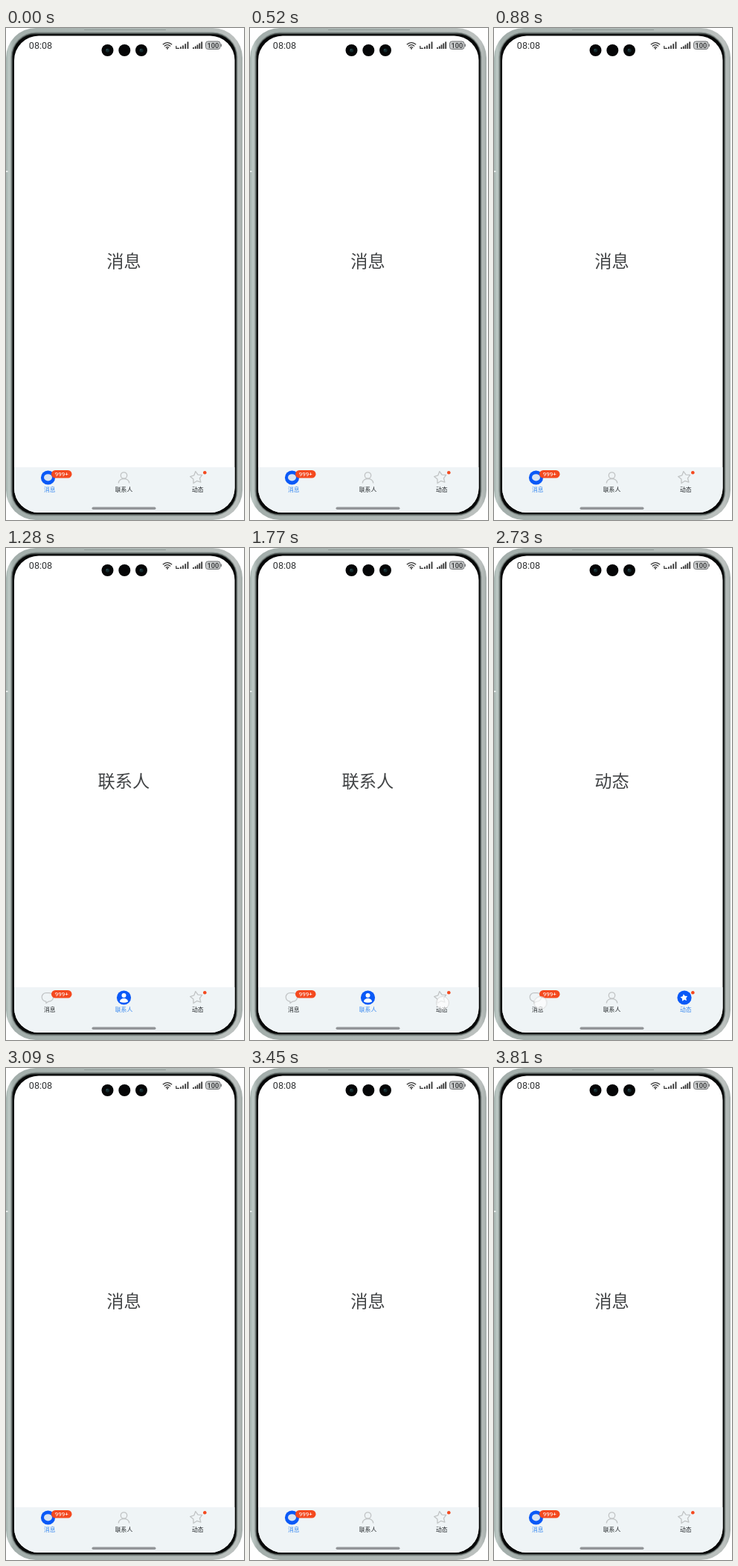
Write an HTML page that moves like this. It is 320x662 px and loops after 3850 ms.

```html
<!DOCTYPE html>
<html lang="en">
<head>
<meta charset="utf-8">
<title>Tab bar</title>
<style>
  html, body { margin: 0; width: 100%; height: 100%; overflow: hidden; background: #fff; }
  svg { display: block; width: 320px; height: 662px; }
  text { font-family: "Noto Sans CJK SC", "Noto Sans CJK", sans-serif; text-anchor: middle; }
  .title { font-size: 23.2px; fill: #424446; }
  .label { font-size: 7.8px; font-weight: 500; fill: color-mix(in srgb, #3a8af0 calc(var(--on) * 100%), #24282b); }
  .latin { font-family: Roboto, sans-serif; }

  .pages { animation: slide 3850ms cubic-bezier(.4, 0, .2, 1) infinite; }
  .tab { animation: 3850ms step-end infinite; }
  .messages { animation-name: messages; }
  .contacts { animation-name: contacts; }
  .moments { animation-name: moments; }
  .on { opacity: var(--on); }
  .off { opacity: calc(1 - var(--on)); fill: none; stroke: #c1c4c5; stroke-width: 1.3; stroke-linejoin: round; }
  .touch { fill: #fff; fill-opacity: .65; stroke: #d2d2d4; stroke-width: .8; animation: touch 3850ms step-end infinite; }

  @keyframes slide {
    0%, 25.45% { transform: translateX(0); }
    33.1%, 46.68% { transform: translateX(-297px); }
    54.47%, 71.95% { transform: translateX(-594px); }
    79.75%, 100% { transform: translateX(0); }
  }
  @keyframes messages { 0% { --on: 1; } 25.45% { --on: 0; } 71.95%, 100% { --on: 1; } }
  @keyframes contacts { 0% { --on: 0; } 25.45% { --on: 1; } 46.68%, 100% { --on: 0; } }
  @keyframes moments { 0% { --on: 0; } 46.68% { --on: 1; } 71.95%, 100% { --on: 0; } }
  @keyframes touch {
    0% { opacity: 0; transform: translate(160px, 612px); }
    23.6% { opacity: 1; transform: translate(160px, 612px); }
    25.45% { opacity: 0; transform: translate(160px, 612px); }
    44.6% { opacity: 1; transform: translate(259px, 612px); }
    46.68% { opacity: 0; transform: translate(259px, 612px); }
    70.1% { opacity: 1; transform: translate(62.5px, 612px); }
    71.95%, 100% { opacity: 0; transform: translate(62.5px, 612px); }
  }
</style>
</head>
<body>
<svg viewBox="0 0 320 662">
  <defs>
    <linearGradient id="metal">
      <stop offset="0" stop-color="#a3b2ae"/>
      <stop offset=".012" stop-color="#bdc9c5"/>
      <stop offset=".03" stop-color="#a3aeab"/>
      <stop offset=".5" stop-color="#adb7b4"/>
      <stop offset=".975" stop-color="#bcc1bf"/>
      <stop offset="1" stop-color="#a5aeab"/>
    </linearGradient>
    <clipPath id="screen"><rect x="11" y="10.5" width="296.5" height="641.5" rx="33"/></clipPath>
    <path id="star" d="M0-8.5 2.6-3.6 8.1-2.6 4.3 1.4 5 6.9 0 4.5-5 6.9-4.3 1.4-8.1-2.6-2.6-3.6Z"/>
    <path id="bubble" d="M-2-6.2H2a6 6 0 0 1 0 12H1.5L-2.2 8.4V5.8a6 6 0 0 1 0-12Z"/>
    <g id="lens"><circle r="8" fill="#050607"/><circle r="2.6" fill="#14282b"/><circle cx="-.8" cy="-.8" r=".9" fill="#31545a"/></g>
  </defs>

  <!-- Phone body, darkening towards the screen -->
  <rect width="318" height="662" rx="40" fill="url(#metal)"/>
  <path d="M105 2.5H215" stroke="#8c9794"/>
  <path d="M0 193H2.5" stroke="#e4ebe9" stroke-width="2"/>
  <rect x="6.5" y="5.5" width="305" height="651" rx="34" fill="#838d8a"/>
  <rect x="7.7" y="6.8" width="302.6" height="648.4" rx="32" fill="#4b5250"/>
  <rect x="8.8" y="8.2" width="300.6" height="645.8" rx="30" fill="#070808"/>

  <g clip-path="url(#screen)">
    <rect x="11" y="10" width="297" height="643" fill="#fff"/>
    <g class="pages">
      <text class="title" x="158.5" y="321.5">消息</text>
      <text class="title" x="455.3" y="321.5">联系人</text>
      <text class="title" x="752.5" y="321.5">动态</text>
    </g>
    <rect x="11" y="591" width="297" height="62" fill="#eff4f6"/>

    <g class="tab messages">
      <use class="off" href="#bubble" transform="translate(56 604.5) scale(.95)"/>
      <g class="on">
        <circle cx="56.5" cy="605" r="9.6" fill="#0a59f7"/>
        <ellipse cx="56.5" cy="604.8" rx="5.5" ry="4.6" fill="#d9e4f2"/>
      </g>
      <rect x="61" y="595" width="27.5" height="10.5" rx="5.2" fill="#f4491f"/>
      <text class="latin" x="74.7" y="603" font-size="8" fill="#fff">999+</text>
      <text class="label" x="58.7" y="624.3">消息</text>
    </g>

    <g class="tab contacts">
      <g class="off">
        <circle cx="158.5" cy="602" r="4.2"/>
        <path d="M151.3 612.5C151.3 604.5 165.7 604.5 165.7 612.5"/>
      </g>
      <g class="on">
        <circle cx="158.5" cy="605" r="9.6" fill="#0a59f7"/>
        <circle cx="158.5" cy="602" r="3" fill="#fff"/>
        <path d="M153 610.5C153 604.5 164 604.5 164 610.5Q158.5 613 153 610.5Z" fill="#fff"/>
      </g>
      <text class="label" x="158.5" y="624.3">联系人</text>
    </g>

    <g class="tab moments">
      <use class="off" href="#star" transform="translate(256 605) rotate(-8)"/>
      <g class="on">
        <circle cx="256" cy="605" r="9.6" fill="#0a59f7"/>
        <use href="#star" transform="translate(255.5 605.2) rotate(-8) scale(.6)" fill="#fff"/>
      </g>
      <circle cx="267.3" cy="598.3" r="2.3" fill="#f4491f"/>
      <text class="label" x="257.7" y="624.3">动态</text>
    </g>

    <rect x="115.5" y="644.5" width="86" height="3.6" rx="1.8" fill="#929598"/>
    <circle class="touch" r="8.5"/>
  </g>

  <!-- Status bar -->
  <text class="latin" x="46.5" y="28.3" font-size="12.6" fill="#303234">08:08</text>
  <use href="#lens" x="136.5" y="30"/>
  <circle cx="159.3" cy="30" r="8" fill="#050607"/>
  <use href="#lens" x="182" y="30"/>
  <g fill="none" stroke="#333" stroke-width="1.2">
    <path d="M210.8 22.3Q217 16.8 223.2 22.3M212.8 24.5Q217 20.8 221.2 24.5M214.8 26.6Q217 24.8 219.2 26.6"/>
    <path stroke-width="1.8" d="M235 28V25.3M238 28V23.5M241.2 28V21.2M244.5 28V18.5M252 28V26M254.800 28V24.5M257.500 28V22.5M260.300 28V20.5M263.200 28V18.5"/>
    <path d="M228.800 24V28M229 27.400H233"/>
  </g>
  <circle cx="217" cy="27.7" r="1" fill="#333"/>
  <rect x="268.5" y="18" width="19.5" height="10.5" rx="3" fill="#c9cbcc" stroke="#707375"/>
  <path d="M289.3 21.5V25" stroke="#707375" stroke-width="1.3"/>
  <text class="latin" x="278.3" y="26.8" font-size="9.2" font-weight="500" fill="#2b2d2e">100</text>
</svg>
</body>
</html>
```
